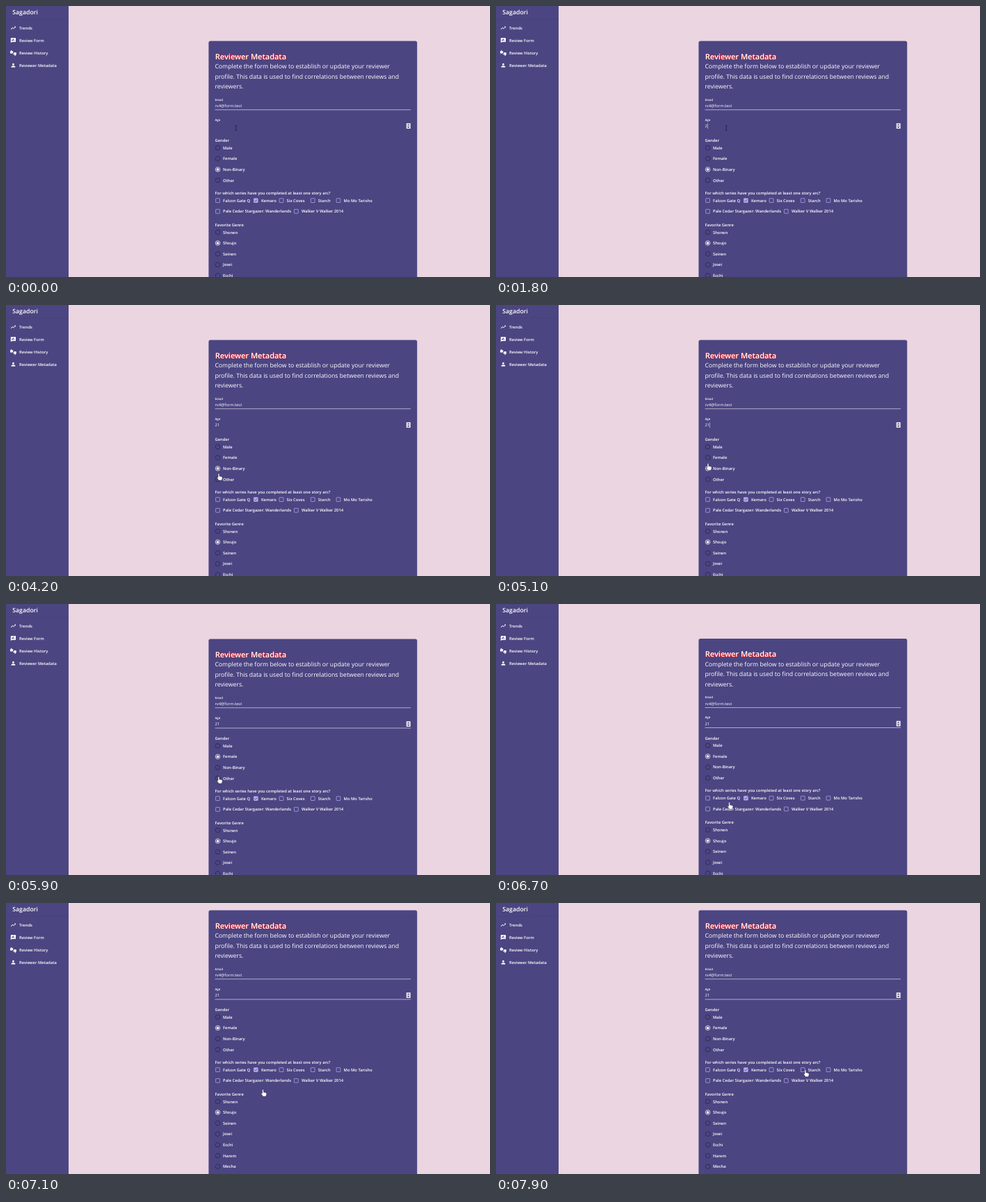
These frames come from a looping animation (696x391 px, 8000 ms). An HTML page:

```html
<!DOCTYPE html>
<html lang="en">
<head>
<meta charset="utf-8">
<title>Reviewer form</title>
<style>
  html, body { margin: 0; width: 100%; height: 100%; overflow: hidden; background: #ead5e0; }
  svg { display: block; width: 696px; height: 391px; }
  text { font: 600 5.8px "Open Sans", "Noto Sans", sans-serif; fill: #fff; text-rendering: geometricPrecision; }
  .brand { font-size: 8.7px; }
  .title { font-size: 11px; }
  .glow { fill: #e8141c; stroke: #e8141c; stroke-width: .7; }
  .intro { font-size: 8.7px; font-weight: 400; }
  .small { font-size: 4.35px; }
  .value { font-weight: 400; }
</style>
</head>
<body>
<svg id="stage" viewBox="0 0 696 391" xmlns="http://www.w3.org/2000/svg"></svg>
<script>
const LOOP = 8000, STEP = 100;
const PANEL = '#4b4582', LILAC = '#b3a9ee', DARK = '#28254a';
const stage = document.getElementById('stage');

function add(parent, tag, attrs = {}, content = '') {
  const el = document.createElementNS('http://www.w3.org/2000/svg', tag);
  for (const key in attrs) el.setAttribute(key, attrs[key]);
  el.textContent = content;
  parent.append(el);
  return el;
}
const rect = (parent, x, y, width, height, fill, more = {}) =>
  add(parent, 'rect', { x, y, width, height, fill, ...more });
const label = (parent, x, y, content, cls = '') =>
  add(parent, 'text', { x, y, class: cls }, content);
const show = (el, on) => el.setAttribute('visibility', on ? 'visible' : 'hidden');

// Sidebar
rect(stage, 0, 0, 696, 391, '#ead5e0');
rect(stage, 0, 0, 90, 391, PANEL);
rect(stage, 0, 18.9, 90, .4, '#000', { opacity: .14 });
label(stage, 9.3, 12.2, 'Sagadori', 'brand');

const thumb = 'M12 6q0-1-1-1H5.8L6.5 1.6 5.4 0 .4 5Q0 5.4 0 6v6.5Q0 14 1.5 14h6.8q1 0 1.4-.9l2.2-5.3z';
const menu = [
  ['Trends', 31.7, ['M16 6l2.3 2.3-4.9 4.9-4-4L2 16.6 3.4 18l6-6 4 4 6.3-6.3L22 12V6z']],
  ['Review Form', 49.7, ['M20 2H4Q2 2 2 4v18l4-4h14q2 0 2-2V4q0-2-2-2zM6 14v-2.5l7.2-7.1 2.4 2.4L8.5 14zm12 0h-7.5l2-2H18z']],
  ['Review History', 67.8, [thumb, thumb]],
  ['Reviewer Metadata', 85.6, ['M12 12a4 4 0 1 0 0-8 4 4 0 0 0 0 8zm0 2c-2.7 0-8 1.3-8 4v2h16v-2c0-2.7-5.3-4-8-4z']],
];
for (const [name, y, paths] of menu) {
  const icon = add(stage, 'g', { transform: `translate(6.1 ${y - 4.35}) scale(.3625)`, fill: '#fff' });
  paths.forEach((d, i) => add(icon, 'path', { d, transform: `rotate(${i * 180} 12 12)` }));
  label(stage, 19, y + 2.1, name);
}

// Form card
const card = add(stage, 'g');
rect(card, 291.4, 50.6, 299.8, 460, PANEL, { rx: 2.6 });
label(card, 301.2, 77.3, 'Reviewer Metadata', 'title glow');
label(card, 300.8, 76.9, 'Reviewer Metadata', 'title');
[
  'Complete the form below to establish or update your reviewer',
  'profile. This data is used to find correlations between reviews and',
  'reviewers.',
].forEach((line, i) => label(card, 300.4, 90.3 + i * 14.4, line, 'intro'));

const underline = y => rect(card, 300.5, y, 281.5, .65, '#fff', { opacity: .85 });
label(card, 300.5, 136.6, 'Email', 'small');
label(card, 300.5, 146.3, 'rv4@form.test', 'value');
underline(149.5);
label(card, 300.5, 165.7, 'Age', 'small');
const age = label(card, 300.5, 175.4, '', 'value');
const ageLine = underline(178.7);
const caret = rect(card, 0, 169.4, .5, 7.6, '#fff');

// Number stepper
rect(card, 575.7, 169.2, 6, 7.8, '#e9e7ee');
add(card, 'path', { d: 'M577 172.3l1.7-1.9 1.7 1.9zM577 174l1.7 1.9 1.7-1.9z', fill: '#3a3944' });

function radio(name, y) {
  const ring = add(card, 'circle', { cx: 304.5, cy: y, r: 3.3, fill: 'none', 'stroke-width': .75 });
  const dot = add(card, 'circle', { cx: 304.5, cy: y, r: 1.85, fill: '#fff' });
  label(card, 312, y + 2.1, name);
  return on => {
    ring.setAttribute('stroke', on ? '#fff' : DARK);
    show(dot, on);
  };
}
const radios = (names, y) => names.map((name, i) => radio(name, y + i * 15.63));

label(card, 300.5, 196.1, 'Gender');
const genders = radios(['Male', 'Female', 'Non-Binary', 'Other'], 204.6);

function checkbox(name, x, y, on) {
  rect(card, x - 2.9, y - 2.9, 5.8, 5.8, on ? LILAC : 'none',
    { rx: .5, stroke: LILAC, 'stroke-width': .75 });
  if (on) add(card, 'path', {
    d: `M${x - 2} ${y}l1.4 1.5 2.7-2.9`, fill: 'none', stroke: PANEL, 'stroke-width': .8,
  });
  label(card, x + 7.6, y + 2.1, name);
}
label(card, 300.5, 271.8, 'For which series have you completed at least one story arc?');
checkbox('Falcon Gate Q', 304.5, 280.6);
checkbox('Kemaro', 359.3, 280.6, true);
checkbox('Six Coves', 396, 280.6);
checkbox('Starch', 441.2, 280.6);
checkbox('Mo Mo Tarisho', 478, 280.6);
checkbox('Pale Cedar Stargazer: Wanderlands', 304.5, 296.3);
checkbox('Walker V Walker 2014', 417.3, 296.3);

label(card, 300.5, 317.7, 'Favorite Genre');
radios(['Shonen', 'Shoujo', 'Seinen', 'Josei', 'Ecchi', 'Harem', 'Mecha'], 326.4)
  .forEach((set, i) => set(i === 1));

// Pointers
const beam = add(stage, 'path', {
  d: 'M-1.4-3.6Q0-3.6 0-2.8Q0-3.6 1.4-3.6M0-3V3M-1.4 3.6Q0 3.6 0 2.8Q0 3.6 1.4 3.6',
  fill: 'none', stroke: '#19172b', 'stroke-width': .65,
});
const hand = add(stage, 'path', {
  d: 'M-1 1q0-1 .9-1t.9 1v3l3 .6q1.6.3 1.4 1.9l-.6 2.3-.6 1.2H0L-2.3 6.6q-.6-1.2.5-1.3l.8.7z',
  fill: '#fff', stroke: '#1b1930', 'stroke-width': .4,
});

// Keys: time, then values; linear between them
const pointerKeys = [
  [3300, 331, 176], [3400, 325, 179], [3600, 318, 191], [3800, 311, 215],
  [4000, 307, 236], [4200, 306, 243], [4300, 306, 243], [4700, 306, 237],
  [5100, 305, 228.4], [5400, 305, 221], [5600, 305, 221], [5800, 305, 236],
  [6000, 307, 262], [6100, 311, 266], [6400, 335.6, 286], [6700, 335.6, 286],
  [6900, 338.5, 283], [7200, 385, 262], [7500, 429.5, 247], [7700, 439, 243],
  [7900, 445, 240.7],
];
const scrollKeys = [[6600, 0], [6700, .5], [6800, 15], [6900, 30], [7000, 37], [7100, 40]];

function track(keys, t) {
  const next = keys.findIndex(key => key[0] > t);
  if (next === 0) return keys[0].slice(1);
  if (next < 0) return keys[keys.length - 1].slice(1);
  const [a, b] = [keys[next - 1], keys[next]];
  const k = (t - a[0]) / (b[0] - a[0]);
  return a.slice(1).map((v, i) => v + (b[i + 1] - v) * k);
}

const caretOn = [[200, 700], [1200, 2900], [3500, 4000], [4600, 5200]];

function draw(now) {
  const t = Math.floor(now % LOOP / STEP) * STEP;
  const chosen = t >= 5500;
  const typed = t < 1700 ? '' : t < 2300 ? '2' : '21';

  age.textContent = typed;
  caret.setAttribute('x', 300.5 + typed.length * 3.45);
  show(caret, caretOn.some(([from, to]) => t >= from && t < to));
  show(ageLine, chosen);
  genders.forEach((set, i) => set(i === (chosen ? 1 : 2)));
  card.setAttribute('transform', `translate(0 ${-track(scrollKeys, t)[0]})`);

  const [x, y] = track(pointerKeys, t);
  const overText = t < 3700;
  show(beam, overText);
  show(hand, !overText);
  (overText ? beam : hand).setAttribute('transform', `translate(${x} ${y})`);
}

const start = performance.now();
function tick() {
  draw(performance.now() - start);
  requestAnimationFrame(tick);
}
tick();
</script>
</body>
</html>
```
